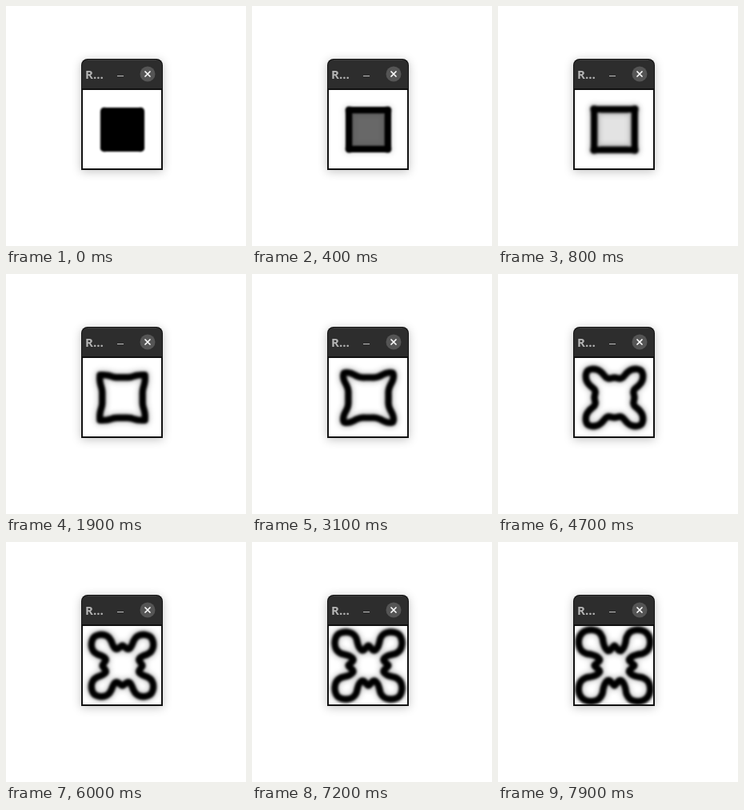
An HTML page with a canvas that plays this animation: 300 px wide and 300 px high, repeating every 8 s.

```html
<!DOCTYPE html>
<html lang="en">
<head>
<meta charset="utf-8">
<title>Reaction</title>
<style>
  html, body { margin: 0; width: 100%; height: 100%; overflow: hidden; background: #fff; }
  svg { position: absolute; left: 0; top: 0; }
  canvas { position: absolute; left: 96px; top: 105px; }
  .win { filter: drop-shadow(0 2px 6px rgba(0, 0, 0, .24)); }
  text { font: bold 15px "Noto Sans", "Open Sans", sans-serif; fill: #b4b4b4; }
</style>
</head>
<body>
<svg width="300" height="300" viewBox="0 0 300 300">
  <path class="win" d="M94 205V74a8 8 0 0 1 8-8h86a8 8 0 0 1 8 8v131z" fill="#111"/>
  <path d="M95 103V74.500a7.500 7.500 0 0 1 7.500-7.500h85a7.500 7.500 0 0 1 7.500 7.500V103z" fill="#2d2d2d"/>
  <path d="M102 67.500h86" stroke="#3d3d3d"/>
  <text x="99" y="91">R…</text>
  <path d="M139 87.500h8" stroke="#bdbdbd"/>
  <circle cx="177" cy="85" r="9.500" fill="#555"/>
  <path d="M173.500 81.500l7 7m0-7l-7 7" stroke="#fff" stroke-width="1.600"/>
</svg>
<canvas width="98" height="98"></canvas>
<script>
const LOOP = 8000, STEP = 100, MID = 49.5;
const ctx = document.querySelector('canvas').getContext('2d');

// One eighth of the outline, from the upright axis to the diagonal.
const square = (side, corner) => Array.from({ length: 11 }, (_, i) => {
  const k = i / 10;
  return [corner * k, side + (corner - side) * k ** 8];
});

const pairs = flat => Array.from({ length: flat.length / 2 }, (_, i) => flat.slice(2 * i, 2 * i + 2));

const poses = [
  [0, square(23.4, 23.4)],
  [8, square(25.3, 26)],
  [31, pairs([0, 25.1, 3.5, 25.1, 7, 25.1, 11, 25.7, 15, 27.2, 18.5, 29,
    22, 30.5, 25, 31.2, 27.5, 31.4, 29.5, 31, 30.6, 30.6])],
  [47, pairs([0, 25, 3.5, 24.4, 7, 23.8, 10, 24.9, 13, 28, 16, 31.3,
    20, 34.2, 24, 35.5, 28.5, 35.6, 31.8, 34.6, 33.5, 33.5])],
  [60, pairs([0, 25, 3.2, 23, 6.5, 20.8, 9.5, 21.7, 12, 25.8, 14, 30.8,
    17, 35.3, 21.5, 38, 27, 38.7, 32, 37.6, 35.5, 35.5])],
  [72, pairs([0, 25, 3, 22.3, 5.5, 19.6, 8.3, 19.2, 11.7, 23, 13.6, 28.5,
    15.5, 35, 20, 40, 27, 42, 33.5, 41.2, 38.5, 38.5])],
  [79, pairs([0, 25, 3, 22, 5.6, 19, 8.4, 18.7, 11.8, 22.8, 13.8, 28.5,
    15.2, 35.5, 19.5, 41.8, 27, 44.6, 34.5, 44, 40.5, 40.5])]
];

const mix = (a, b, k) => a + (b - a) * k;

function eighth(step) {
  let i = 0;
  while (i < poses.length - 2 && step > poses[i + 1][0]) i++;
  const [t0, from] = poses[i], [t1, to] = poses[i + 1];
  const k = (step - t0) / (t1 - t0);
  return from.map((p, j) => [mix(p[0], to[j][0], k), mix(p[1], to[j][1], k)]);
}

// Mirror over the diagonal, then turn four times.
function outline(step) {
  const part = eighth(step);
  const mirrored = part.slice(1, -1).reverse().map(([x, y]) => [y, x]);
  let quarter = part.concat(mirrored);
  const all = [];
  for (let i = 0; i < 4; i++) {
    all.push(...quarter);
    quarter = quarter.map(([x, y]) => [y, -x]);
  }
  return all.map(([x, y]) => [MID + x, MID - y]);
}

function smooth(pts) {
  const path = new Path2D(), n = pts.length;
  const at = i => pts[(i + n) % n];
  path.moveTo(...pts[0]);
  for (let i = 0; i < n; i++) {
    const [a, b, c, d] = [at(i - 1), at(i), at(i + 1), at(i + 2)];
    path.bezierCurveTo(
      b[0] + (c[0] - a[0]) / 6, b[1] + (c[1] - a[1]) / 6,
      c[0] - (d[0] - b[0]) / 6, c[1] - (d[1] - b[1]) / 6, c[0], c[1]);
  }
  path.closePath();
  return path;
}

function stroke(path, width, blur, alpha) {
  ctx.filter = `blur(${blur}px)`;
  ctx.lineWidth = width;
  ctx.strokeStyle = `rgba(0, 0, 0, ${alpha})`;
  ctx.stroke(path);
}

function draw(step) {
  const path = smooth(outline(step));
  const grown = Math.min(1, step / 8);
  const core = Math.max(0, 1 - 0.11 * Math.exp(0.42 * (8 - step)));
  const grey = Math.round(255 * core);

  ctx.filter = 'none';
  ctx.fillStyle = '#fff';
  ctx.fillRect(0, 0, 98, 98);
  ctx.lineJoin = 'round';
  ctx.fillStyle = `rgb(${grey}, ${grey}, ${grey})`;
  ctx.fill(path);
  stroke(path, 13, 3, 0.2 * grown);
  stroke(path, 8.4, mix(0.8, 1.6, grown), 1);
}

let shown = -1;
function tick() {
  const step = Math.floor(performance.now() % LOOP / STEP);
  if (step !== shown) draw(shown = step);
  requestAnimationFrame(tick);
}
tick();
</script>
</body>
</html>
```
